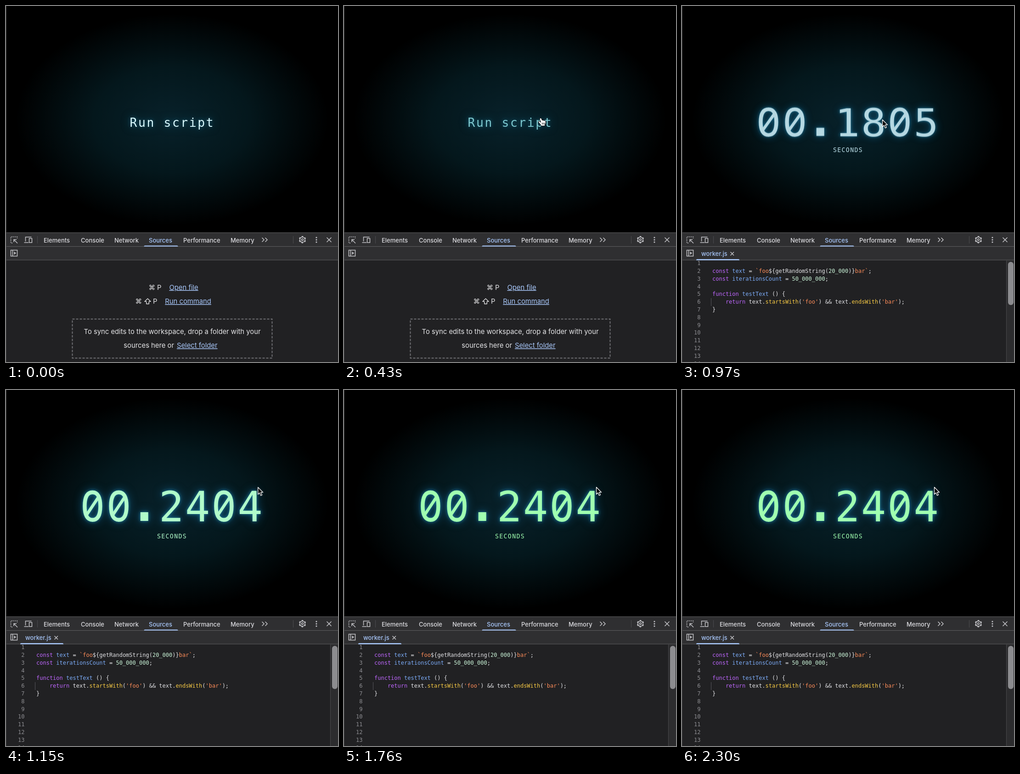
An HTML page for the animation above (2.33 s loop, 723 by 775 pixels).

```html
<!DOCTYPE html>
<html lang="en">
<head>
<meta charset="utf-8">
<title>Script timer</title>
<style>
html, body { margin: 0; width: 100%; height: 100%; overflow: hidden; background: #000; }
svg { display: block; }
text { white-space: pre; }
.mono { font-family: "DejaVu Sans Mono", monospace; }
.ui { font: 500 13px Inter, sans-serif; fill: #dcdce0; }
.body { font: 14.8px Inter, sans-serif; fill: #e6e6e8; }
.key { font: 14.6px "DejaVu Sans", sans-serif; }
.link { fill: #a8c7fa; text-decoration: underline; }
.blue, .ui.blue { fill: #a8c7fa; }
.icon { fill: none; stroke: #c4c4c8; stroke-width: 1.5; }
.code { font-size: 12px; fill: #e3e3e6; }
.kw { fill: #bf67ff; }
.def { fill: #7cacf8; }
.str { fill: #fe8d59; }
.num { fill: #c8f2d6; }
.fn { fill: #f8cb45; }

.title, .title text, .count, .digits, .tint, .label, .idle, .loaded, .cursor, .hand, .arrow {
  animation: 2330ms cubic-bezier(.33, 0, .67, 1) infinite;
}
.title { animation-name: lift; filter: drop-shadow(0 0 4px rgba(30,140,180,.45)) drop-shadow(0 0 9px rgba(20,110,140,.5)); }
.title text { animation-name: hover, fade; font-size: 26.3px; letter-spacing: .1em; }
.count { animation-name: grow; transform-origin: 361px 253px; }
.digits { animation-name: glow; }
.tint { animation-name: tint; font-size: 90px; fill: currentColor; }
.label { animation-name: drop, labelTint; font-size: 13.2px; letter-spacing: .1em; }
.idle { animation-name: idle; }
.loaded { animation-name: loaded; }
.cursor { animation-name: travel; }
.hand { animation-name: hand; }
.arrow { animation-name: arrow; }

@keyframes hover { 0%, 14.6% { fill: #dafaff; } 18.3%, 100% { fill: #7cc8cf; } }
@keyframes lift { 0%, 27.25% { transform: none; } 40.56%, 100% { transform: translateY(-108px); } }
@keyframes fade { 0%, 28% { opacity: 1; } 41%, 100% { opacity: 0; } }
@keyframes grow {
  0%, 27.25% { transform: scaleY(0); opacity: 0; }
  44.42%, 100% { transform: none; opacity: 1; }
}
@keyframes glow {
  0%, 33.48% { filter: drop-shadow(0 0 3px rgba(40,150,190,0)) drop-shadow(0 0 9px rgba(20,110,160,0)); }
  42.92%, 100% { filter: drop-shadow(0 0 3px rgba(40,150,190,.7)) drop-shadow(0 0 9px rgba(20,110,160,.65)); }
}
@keyframes tint {
  0%, 33.48% { color: #020e12; }
  42.92%, 44.21% { color: #cdf2fc; }
  52.79%, 100% { color: #a0ffb0; }
}
@keyframes drop {
  0%, 27.25% { transform: translateY(-65px); }
  44.42%, 100% { transform: none; }
}
@keyframes labelTint {
  0%, 30.04% { fill: #cdf2fc; opacity: 0; }
  44.21% { fill: #cdf2fc; opacity: 1; }
  52.79%, 100% { fill: #a0ffb0; opacity: 1; }
}
@keyframes idle { 0%, 36.9% { visibility: visible; } 36.91%, 100% { visibility: hidden; } }
@keyframes loaded { 0%, 36.9% { visibility: hidden; } 36.91%, 100% { visibility: visible; } }
@keyframes travel {
  0%, 1.29% { transform: translate(692px, 728px); }
  17.2%, 36.48% { transform: translate(428px, 247px); }
  41.63% { transform: translate(436px, 247px); }
  49.79%, 100% { transform: translate(549px, 211px); }
}
@keyframes hand {
  0%, 14.6% { visibility: hidden; }
  14.61%, 27.46% { visibility: visible; }
  27.47%, 100% { visibility: hidden; }
}
@keyframes arrow {
  0%, 1.28% { visibility: hidden; }
  1.29%, 14.6% { visibility: visible; }
  14.61%, 27.46% { visibility: hidden; }
  27.47%, 100% { visibility: visible; }
}
</style>
</head>
<body>
<svg width="723" height="775" viewBox="0 0 723 775">
  <defs>
    <radialGradient id="halo" gradientUnits="userSpaceOnUse" r="1"
      gradientTransform="translate(361.5 247) scale(340 230)" cx="0" cy="0">
      <stop offset="0" stop-color="#08212a"/>
      <stop offset=".5" stop-color="#04171c"/>
      <stop offset="1" stop-color="#000"/>
    </radialGradient>
    <g id="zero" fill="none" stroke="currentColor">
      <path stroke-width="8.4" d="M27.1 -62.8C38.5 -62.8 44.1 -52 44.1 -32.8S38.5 -2.8 27.1 -2.8 10.1 -13.6 10.1 -32.8 15.7 -62.8 27.1 -62.8Z"/>
      <path stroke-width="6.5" d="M14.5 -14L39.5 -51.5"/>
    </g>
    <rect id="dot" x="17" y="-19.5" width="17" height="19"/>
  </defs>

  <rect width="723" height="775" fill="#000"/>
  <rect width="723" height="493" fill="url(#halo)"/>

  <g class="title mono"><text x="269.6" y="263">Run script</text></g>
  <g class="count mono"><g class="digits"><g class="tint" id="digits"></g></g></g>
  <text class="label mono" x="329.1" y="323">SECONDS</text>

  <!-- tool bars -->
  <rect y="493" width="723" height="282" fill="#212123"/>
  <rect y="493" width="723" height="60" fill="#2f2f31"/>
  <path stroke="#5e5e61" d="M0 493.5H723M0 523.5H723M0 553H723"/>
  <path stroke="#4c4c50" d="M68.5 501V517M625.5 501V517"/>
  <g class="ui">
    <text x="82" y="514.5">Elements</text>
    <text x="163" y="514.5">Console</text>
    <text x="236" y="514.5">Network</text>
    <text x="311" y="514.5" class="ui blue">Sources</text>
    <text x="386" y="514.5">Performance</text>
    <text x="489" y="514.5">Memory</text>
  </g>
  <path class="blue" d="M300.5 523.5V523Q300.5 521.5 302.5 521.5H372.5Q374.5 521.5 374.5 523V523.5Z"/>
  <g class="icon">
    <path stroke-dasharray="2 1.7" d="M14 516H10.5V502.5H24.5V506"/>
    <path d="M17 514V508.5H23M17.5 509L25 516.5"/>
    <path d="M42.5 512.5V503H55.5M39.5 515H49"/>
    <rect x="50.5" y="506" width="6" height="9"/>
    <path d="M557.5 504.5L562 509L557.5 513.5M564.5 504.5L569 509L564.5 513.5"/>
    <g transform="rotate(-104 645.5 508.7)">
      <circle cx="645.5" cy="508.7" r="5.6"/>
      <circle cx="645.5" cy="508.7" r="6.9" stroke-dasharray="3.4 3.825" stroke-width="2"/>
      <circle cx="645.5" cy="508.7" r="2.1"/>
    </g>
    <path d="M698.5 504L708.5 514M708.5 504L698.5 514"/>
    <path d="M10.5 531.5H24.5V544.5H10.5ZM14.5 531.5V544.5"/>
  </g>
  <g fill="#c4c4c8">
    <path d="M17.5 534.5L22 538L17.5 541.5Z"/>
    <circle cx="676" cy="504" r="1.6"/><circle cx="676" cy="509" r="1.6"/><circle cx="676" cy="514" r="1.6"/>
  </g>

  <g class="idle body">
    <g class="key">
      <text x="310.5" y="617.5">⌘</text>
      <text x="281.5" y="648">⌘</text>
    </g>
    <path fill="none" stroke="#e6e6e8" stroke-width="1.3" stroke-linejoin="round" d="M308.5 637L315 643.3H311.3V648.5H305.7V643.3H302Z"/>
    <text x="329" y="617.5">P</text>
    <text x="320" y="648">P</text>
    <text x="355.5" y="617.5" class="link">Open file</text>
    <text x="346.3" y="648" class="link">Run command</text>
    <rect x="144.5" y="681.5" width="435" height="85" fill="none" stroke="#707074" stroke-width="2" stroke-dasharray="5 3"/>
    <text x="362" y="713.8" text-anchor="middle">To sync edits to the workspace, drop a folder with your</text>
    <text x="256.3" y="744.3">sources here or</text>
    <text x="372" y="744.3" class="link">Select folder</text>
  </g>

  <g class="loaded">
    <text x="42" y="544" class="ui blue">worker.js</text>
    <path class="icon" d="M105.5 535.5L113 543M113 535.5L105.5 543"/>
    <path class="blue" d="M31 553.5V553Q31 551 33 551H123Q125 551 125 553V553.5Z"/>
    <g class="code mono">
      <g id="gutter" fill="#8e8e92" text-anchor="end"></g>
      <text x="66" y="581"><tspan class="kw">const</tspan> <tspan class="def">text</tspan> = <tspan class="str">`foo</tspan>${getRandomString(<tspan class="num">20_000</tspan>)}<tspan class="str">bar`</tspan>;</text>
      <text x="66" y="597.8"><tspan class="kw">const</tspan> <tspan class="def">iterationsCount</tspan> = <tspan class="num">50_000_000</tspan>;</text>
      <text x="66" y="631.4"><tspan class="kw">function</tspan> <tspan class="def">testText</tspan> () {</text>
      <text x="94.9" y="648.2"><tspan class="kw">return</tspan> text.<tspan class="fn">startsWith</tspan>(<tspan class="str">'foo'</tspan>) &amp;&amp; text.<tspan class="fn">endsWith</tspan>(<tspan class="str">'bar'</tspan>);</text>
      <text x="66" y="665">}</text>
    </g>
    <path stroke="#55555a" d="M63.5 636V653"/>
    <rect x="707" y="554" width="16" height="221" fill="#2c2c2e"/>
    <path stroke="#48484c" d="M706.5 554V775"/>
    <rect x="710" y="557" width="12" height="94" rx="6" fill="#8c8c8f"/>
  </g>

  <path stroke="#3c3c3e" d="M.5 0V775"/>

  <g class="cursor" stroke-linejoin="round">
    <path class="arrow" fill="#000" stroke="#fff" stroke-width="1.3" d="M.5 .5V16L4 12.7L6.5 18.6L9.3 17.4L6.8 11.7H11.5Z"/>
    <path class="hand" fill="#fff" stroke="#000" stroke-width=".9" d="M0 -3Q-2.2 -3.5 -1.8 -1L.6 6.2L-2.5 3.8Q-5.2 3 -5 5L.8 12.2V14H9.5V12Q12 8 11.3 3.5Q10.5 2 9 3Q8 1.3 6.3 2.2Q5 .8 3.4 1.8L2 -2Q1.4 -3.3 0 -3ZM3.6 7V11M6 7V11M8.4 7V11"/>
  </g>
</svg>
<script>
const START = 789.5, TOTAL = 240.4, PITCH = 57.2, REFRESH = 30;
const digits = document.getElementById('digits');
const clock = digits.getAnimations()[0];
const glyph = { 0: 'zero', '.': 'dot' };

document.getElementById('gutter').innerHTML = Array.from({ length: 14 }, (_, i) =>
  `<text x="40.5" y="${564.2 + i * 16.8}">${i + 1}</text>`).join('');

let shown = '';
function tick(now) {
  const time = (clock ? clock.currentTime || 0 : now) % 2330;
  // the counter refreshes in steps
  const step = Math.floor((time + 10) / REFRESH) * REFRESH + 10;
  const ms = Math.min(Math.max(step - START, 0), TOTAL);
  const value = (ms / 1000).toFixed(4).padStart(7, '0');
  if (value !== shown) {
    shown = value;
    digits.innerHTML = [...value].map((c, i) => {
      const at = `x="${161.3 + i * PITCH}" y="285.5"`;
      return glyph[c] ? `<use href="#${glyph[c]}" ${at}/>` : `<text ${at}>${c}</text>`;
    }).join('');
  }
  requestAnimationFrame(tick);
}
tick(performance.now());
</script>
</body>
</html>
```
